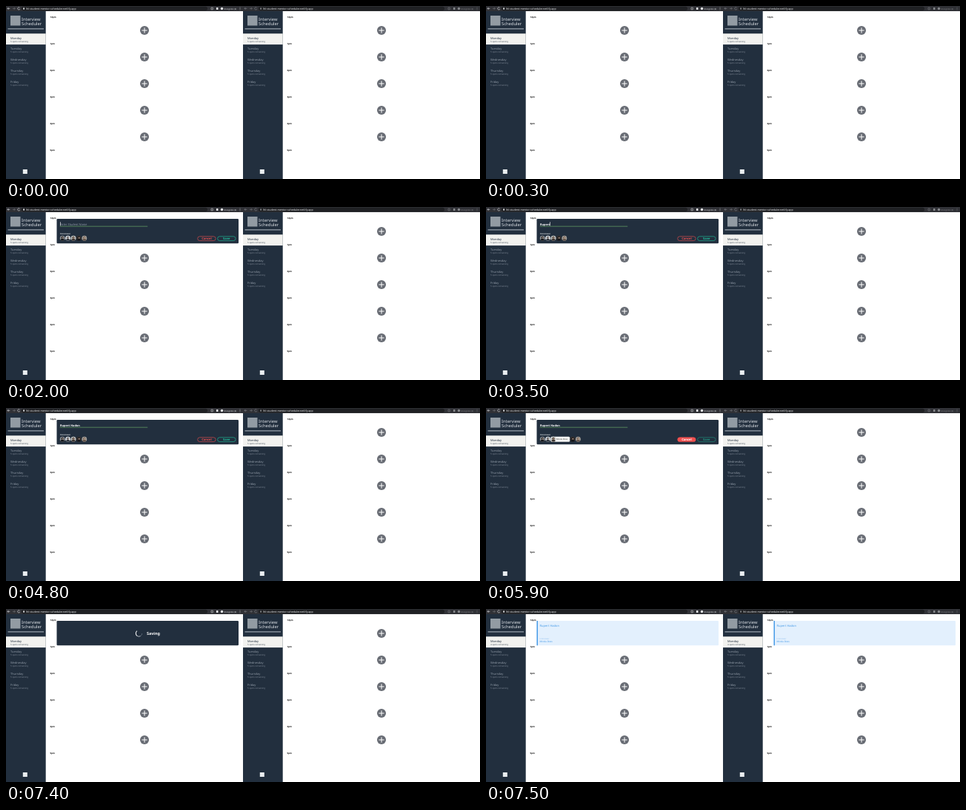
An HTML page that plays this animation: 640 px wide and 234 px high, repeating every 8 s.

```html
<!DOCTYPE html>
<html lang="en">
<head>
<meta charset="utf-8">
<title>Interview Scheduler</title>
<style>
  html, body { margin: 0; height: 100%; overflow: hidden; background: #fff; }
  svg { display: block; width: 640px; height: 234px; }
  text { font-family: "Noto Sans", "Open Sans", sans-serif; white-space: pre; text-rendering: geometricPrecision; }
</style>
</head>
<body>
<svg id="stage" viewBox="0 0 640 234"></svg>
<script>
const LOOP = 8000;
const STUDENT = 'Rupert Hadon', INTERVIEWER = 'Mirela Doss';
const NAVY = '#222f3e', RED = '#f0504f', GREEN = '#1fc4a0', BLUE = '#4a9de8';
// Time at which each character of the student name is typed
const KEYS = [2300, 2500, 2800, 3000, 3500, 3500, 3600, 3800, 4000, 4100, 4200, 4300];
const T = { form: 500, focus: 1800, pick: 5300, cancel: 5900, save: 6000, saving: 6300, saved: 7500 };

const rect = (x, y, w, h, fill, extra = '') =>
  `<rect x="${x}" y="${y}" width="${w}" height="${h}" fill="${fill}" ${extra}/>`;
const circle = (x, y, r, fill, extra = '') => `<circle cx="${x}" cy="${y}" r="${r}" fill="${fill}" ${extra}/>`;
const line = (d, color, width = .6) => `<path d="${d}" fill="none" stroke="${color}" stroke-width="${width}"/>`;
const text = (x, y, size, fill, str, extra = '') =>
  `<text x="${x}" y="${y}" font-size="${size}" fill="${fill}" ${extra}>${str}</text>`;
const group = (id, body, extra = '') => `<g id="${id}" ${extra}>${body}</g>`;

function browserBar(dim) {
  const ink = dim ? '#85878b' : '#e8eaed';
  return rect(0, 0, 320, 7, '#303136') + rect(21, .8, 251, 5.4, '#1f2023', 'rx="2.7"') +
    line('M5.3 3.4H2M3.5 1.9L2 3.4 3.5 4.9', ink) +
    line('M9 3.4H12.3M10.8 1.9L12.3 3.4 10.8 4.9', '#77797d') +
    line('M18.6 2.5A1.6 1.6 0 1 0 18.8 4', ink) +
    rect(23.2, 2.9, 1.8, 1.7, ink) + line('M23.6 3V2.4a.5 .5 0 0 1 1 0V3', ink, .4) +
    text(27, 4.7, 3.6, '#e8eaed', 'lhl-student-mentor-scheduler.netlify.app') +
    line('M277 2.2h2.4v2.6h-2.4z', ink, .5) + rect(284, 2, 2.4, 3, ink) +
    circle(291.5, 3.5, 1.7, ink) +
    text(294.5, 4.5, 2.8, ink, 'Incognito (2)') +
    [2, 3.5, 5].map(y => circle(316, y, .4, ink)).join('');
}

function sidebar(id) {
  const days = ['Monday', 'Tuesday', 'Wednesday', 'Thursday', 'Friday'].map((day, i) => {
    const y = 44.6 + i * 14.75;
    return text(6, y, 3.95, i ? '#8f99a5' : NAVY, day) +
      text(6, y + 4.1, 2.85, i ? '#808b98' : '#4a5460', `<tspan class="${i ? '' : 'spots'}">5</tspan> spots remaining`);
  }).join('');
  return rect(0, 7, 53.7, 227, NAVY) + rect(6, 13, 13.5, 13.5, '#929ba3') +
    text(21, 19.6, 5.8, '#dfe3e8', 'Interview', 'font-weight="300"') +
    text(21, 25.9, 5.8, '#dfe3e8', 'Scheduler', 'font-weight="300"') +
    rect(2.5, 30.4, 48.5, 1, '#b4bcc5') + rect(0, 37.3, 53.7, 14.8, '#f2f2ef') + days +
    rect(22.8, 221, 6, 6, '#e9edf0');
}

function schedule() {
  return ['12pm', '1pm', '2pm', '3pm', '4pm', '5pm'].map((hour, i) => {
    const y = 33 + i * 36;
    const add = circle(187, y, 6, '#686c74') + line(`M183.4 ${y}h7.2M187 ${y - 3.6}v7.2`, '#fff', 1);
    return text(59.5, y - 17, 2.9, '#111', hour, 'font-weight="700"') +
      (i == 5 ? '' : `<g class="${i ? '' : 'first'}">${add}</g>`);
  }).join('');
}

const appointment = () => `<g class="booked">` +
  rect(68.5, 16, 245.5, 33.3, '#e3f0fd', 'rx="1"') + rect(68.5, 16, 1.5, 33.3, BLUE) +
  text(72.6, 24.4, 4, BLUE, STUDENT) +
  text(72.6, 41, 2.4, '#8fbfec', 'Interviewer') + text(72.6, 45, 3.15, BLUE, INTERVIEWER) + '</g>';

const browser = (x, dim) =>
  `<g transform="translate(${x})">${schedule()}${appointment()}${sidebar()}${browserBar(dim)}</g>`;

function avatar(i, [back, hair, skin]) {
  return group('avatar' + i, circle(0, 0, 3.4, back) +
    `<path d="M-2.6 2.2a2.7 2.7 0 0 1 5.2 0A3.4 3.4 0 0 1 -2.6 2.2z" fill="${hair}"/>` +
    circle(0, -.9, 1.6, hair) + circle(.3, -.5, 1, skin));
}

const button = (id, x, color, label) => group(id,
  `<rect x="${x}" y="39.8" width="24.4" height="5.8" rx="2.9" fill="none" stroke="${color}" stroke-width=".6"/>` +
  text(x + 12.2, 44.2, 4.1, color, label, 'text-anchor="middle" font-weight="600"'));

const tones = [
  ['#8b8e91', '#17191d', '#b89f90'], ['#e2e6e9', '#30363e', '#c9b5a8'], ['#c8c8c4', '#3c3430', '#ae8f7c'],
  ['#33302f', '#15161a', '#b59683'], ['#a5a09a', '#66574d', '#c8aa95']
];
const panel = rect(68.5, 16, 245.5, 33.3, NAVY, 'rx="1.2"');

const form = panel +
  text(73, 24.6, 4.1, '#8b96a2', 'Enter Student Name', 'id="hint" font-style="italic"') +
  text(73, 24.6, 3.85, '#fff', '', 'id="typed" font-weight="700"') +
  rect(0, 20.2, .6, 5.2, '#fff', 'id="caret"') +
  rect(72.7, 25.8, 118.5, .6, '#74b66c') +
  text(73, 36.8, 2.4, '#e4e8ec', 'Interviewer', 'font-weight="600"') +
  group('pill', rect(87.4, 38.7, 25.8, 7, '#f7f7f5', 'rx="1.5"') + text(95, 43.2, 2.75, '#333', INTERVIEWER)) +
  tones.map((tone, i) => avatar(i, tone)).join('') +
  button('cancel', 258.7, RED, 'Cancel') + button('save', 285.6, GREEN, 'Save');

const saving = panel +
  group('spinner', line('M-2.6 -3.3A4.2 4.2 0 0 0 -2.6 3.3', '#fff', 1) +
    line('M-2.6 3.3A4.2 4.2 0 0 0 2.1 3.6', '#d5dae0', .8) +
    line('M2.1 3.6A4.2 4.2 0 0 0 4.2 0', '#8994a0', .5)) +
  text(190, 35, 5.4, '#fff', 'Saving', 'font-weight="700"');

document.getElementById('stage').innerHTML = rect(0, 0, 640, 234, '#fff') +
  browser(0, false) + browser(320, true) + group('form', form) + group('saving', saving);

const el = id => document.getElementById(id);
const all = selector => document.querySelectorAll(selector);
const show = (node, on) => node.style.display = on ? '' : 'none';

function hover(id, color, on) {
  const [box, label] = el(id).children;
  box.setAttribute('fill', on ? color : 'none');
  label.setAttribute('fill', on ? '#fff' : color);
}

function render(t) {
  const saved = t >= T.saved, picked = t >= T.pick;
  show(el('form'), t >= T.form && t < T.saving);
  show(el('saving'), t >= T.saving && !saved);
  all('.booked').forEach(node => show(node, saved));
  all('.first').forEach((node, i) => show(node, i ? !saved : t < T.form));
  all('.spots').forEach(node => node.textContent = saved ? 4 : 5);

  const typed = STUDENT.slice(0, KEYS.filter(key => t >= key).length);
  el('typed').textContent = typed;
  show(el('hint'), !typed);
  show(el('caret'), t >= T.focus && t < 4800 || t >= 5000 && t < T.pick);
  el('caret').setAttribute('x', 73 + (typed ? el('typed').getComputedTextLength() : 0));

  show(el('pill'), picked);
  tones.forEach((_, i) => {
    const x = 76.2 + i * 7.4 + (picked && i > 2 ? 18.6 : 0);
    el('avatar' + i).setAttribute('transform', `translate(${x} 42.2)`);
  });
  hover('cancel', RED, t >= T.cancel && t < T.save);
  hover('save', GREEN, t >= T.save);
  el('save').setAttribute('opacity', t >= T.cancel && t < T.save ? .7 : 1);
  el('spinner').setAttribute('transform', `translate(179.5 33) rotate(${(t - 7400) * .18})`);
}

function tick(now) {
  render(now % LOOP);
  requestAnimationFrame(tick);
}
render(0);
requestAnimationFrame(tick);
</script>
</body>
</html>
```
